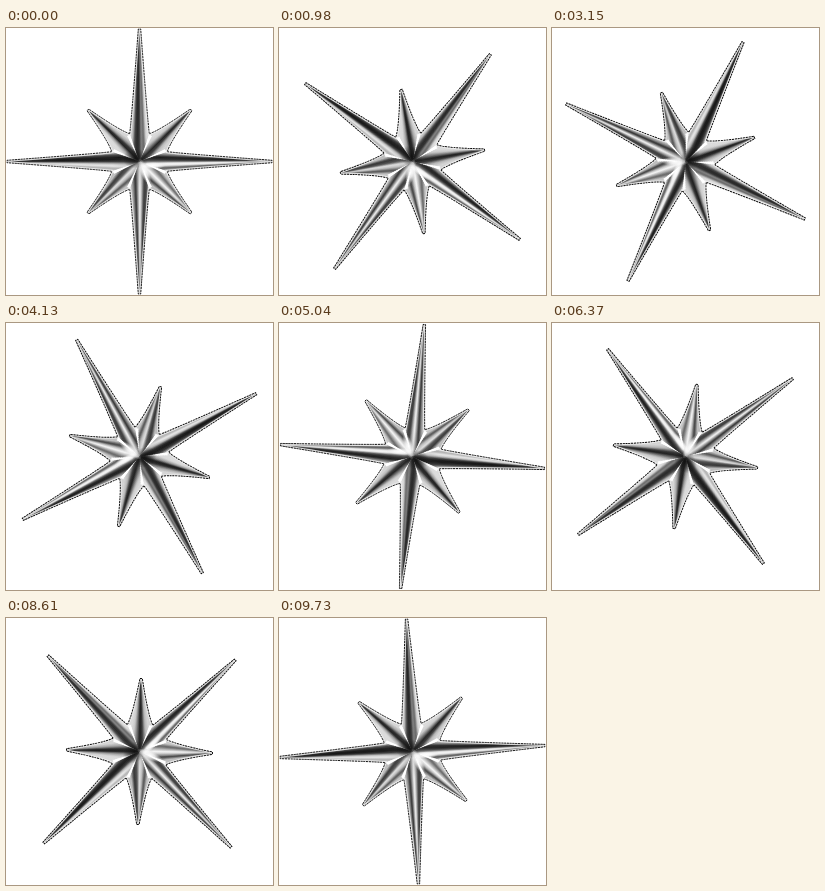
Write an HTML page that moves like this. It is 267 by 267 pixels and loops after 9800 ms.

```html
<!DOCTYPE html>
<html lang="en">
<head>
<meta charset="utf-8">
<title>Spinning chrome star</title>
<style>
  html, body { margin: 0; width: 100%; height: 100%; overflow: hidden; background: #fff; }
  svg { display: block; width: 100%; height: 100%; }
</style>
</head>
<body>
<svg viewBox="0 0 267 267">
  <defs>
    <clipPath id="body"><path id="clip"/></clipPath>
    <radialGradient id="glow">
      <stop offset="0" stop-color="#fff"/>
      <stop offset=".45" stop-color="#fff" stop-opacity=".75"/>
      <stop offset="1" stop-color="#fff" stop-opacity="0"/>
    </radialGradient>
    <radialGradient id="shade">
      <stop offset="0" stop-color="#0c0c0c" stop-opacity=".8"/>
      <stop offset="1" stop-color="#0c0c0c" stop-opacity="0"/>
    </radialGradient>
  </defs>
  <g id="star">
    <g clip-path="url(#body)">
      <g id="arms"></g>
      <ellipse cx="-4" cy="-3" rx="13" ry="10" fill="url(#shade)"/>
      <ellipse cx="5" cy="10" rx="4.5" ry="14" transform="rotate(-22 5 10)" fill="url(#glow)"/>
      <ellipse cx="13" cy="4" rx="13" ry="3.5" fill="url(#glow)"/>
      <path id="rim" fill="none" stroke="#f0f0f0" stroke-opacity=".85" stroke-width="3"/>
    </g>
    <path id="edge" fill="none" stroke="#0a0a0a" stroke-width=".95" stroke-dasharray="2 .8"/>
  </g>
</svg>
<script>
const FRAME = 70, COUNT = 140, CENTER = 133.5;
const LONG = 132.5, SHORT = 73, NOTCH = 29.5, NOTCH_TURN = 19.5;
const BLUNT = 1.2, SLICES = 24;

// Grey levels across each arm, clockwise from the top
const tones = [
  [215, 190, 60, 30, 45, 130, 95, 215, 225],
  [220, 200, 110, 25, 50, 180, 215],
  [215, 130, 25, 30, 90, 245, 235, 70, 205],
  [215, 90, 180, 250, 190, 50, 210],
  [215, 60, 55, 170, 250, 150, 35, 140, 215],
  [215, 70, 190, 225, 80, 45, 210],
  [215, 170, 235, 190, 60, 18, 22, 60, 215],
  [220, 215, 150, 25, 35, 160, 220]
];

const NS = "http://www.w3.org/2000/svg";
const $ = id => document.getElementById(id);
const mix = (a, b, k) => a + (b - a) * k;
const grey = v => `rgb(${[v, v, v].map(Math.round)})`;
const pt = p => p.map(n => n.toFixed(2)).join(" ");

function add(parent, tag, attrs) {
  const el = document.createElementNS(NS, tag);
  for (const key in attrs) el.setAttribute(key, attrs[key]);
  return parent.appendChild(el);
}

// Point at a distance along an arm and to its clockwise side
function place(deg, along, across) {
  const a = deg * Math.PI / 180, s = Math.sin(a), c = Math.cos(a);
  return [s * along + c * across, s * across - c * along];
}

function sample(list, k) {
  const x = k * (list.length - 1);
  const i = Math.min(Math.floor(x), list.length - 2);
  return mix(list[i], list[i + 1], x - i);
}

let outline = "";
tones.forEach((levels, i) => {
  const isLong = i % 2 === 0;
  const dir = i * 45;
  const length = isLong ? LONG : SHORT;
  const turn = (isLong ? NOTCH_TURN : 45 - NOTCH_TURN) * Math.PI / 180;
  const foot = NOTCH * Math.cos(turn), half = NOTCH * Math.sin(turn);
  const at = (along, across) => place(dir, along, across);

  // Sides flare out close to the notches
  const bendAlong = mix(foot, length, isLong ? .1 : .2);
  const bendAcross = mix(half, BLUNT, isLong ? .18 : .42);
  outline += (i ? "" : "M" + pt(at(foot, -half)))
    + `Q${pt(at(bendAlong, -bendAcross))} ${pt(at(length, -BLUNT))}`
    + `L${pt(at(length, BLUNT))}`
    + `Q${pt(at(bendAlong, bendAcross))} ${pt(at(foot, half))}`;

  // The base runs from one notch through the centre to the other
  const base = u => at(foot * Math.abs(u), bendAcross * 1.12 * u);
  const tip = at(length, 0);

  for (let s = 0; s < SLICES; s++) {
    const u0 = 2 * s / SLICES - 1, u1 = u0 + 2 / SLICES;
    const tone = sample(levels, (s + .5) / SLICES);
    const id = `g${i}-${s}`;
    const grad = add($("arms"), "linearGradient", {
      id, gradientUnits: "userSpaceOnUse", x1: 0, y1: 0, x2: tip[0], y2: tip[1]
    });
    [[0, mix(tone, 60, .2)], [.2, tone], [.6, tone], [1, mix(tone, 120, .35)]]
      .forEach(([offset, v]) => add(grad, "stop", { offset, "stop-color": grey(v) }));
    // Outermost slices widen to cover the flare
    const outer = s === 0 ? -1 : s === SLICES - 1 ? 1 : 0;
    const flare = outer ? "L" + pt(at(foot, half * outer)) : "";
    const [a, b] = outer > 0 ? [u0, u1] : [u1, u0];
    add($("arms"), "path", {
      d: `M${pt(at(length, BLUNT * a))}L${pt(base(a))}L${pt(base(b))}${flare}L${pt(at(length, BLUNT * b))}Z`,
      fill: `url(#${id})`, stroke: `url(#${id})`, "stroke-width": .5, "stroke-linejoin": "bevel"
    });
  }
});
["clip", "rim", "edge"].forEach(id => $(id).setAttribute("d", outline + "Z"));

function draw(ms) {
  const step = Math.floor(ms / FRAME) % COUNT;
  $("star").setAttribute("transform",
    `translate(${CENTER} ${CENTER}) rotate(${step * 360 / COUNT})`);
}

const start = performance.now();
function tick() {
  draw(performance.now() - start);
  requestAnimationFrame(tick);
}
draw(0);
requestAnimationFrame(tick);
</script>
</body>
</html>
```
